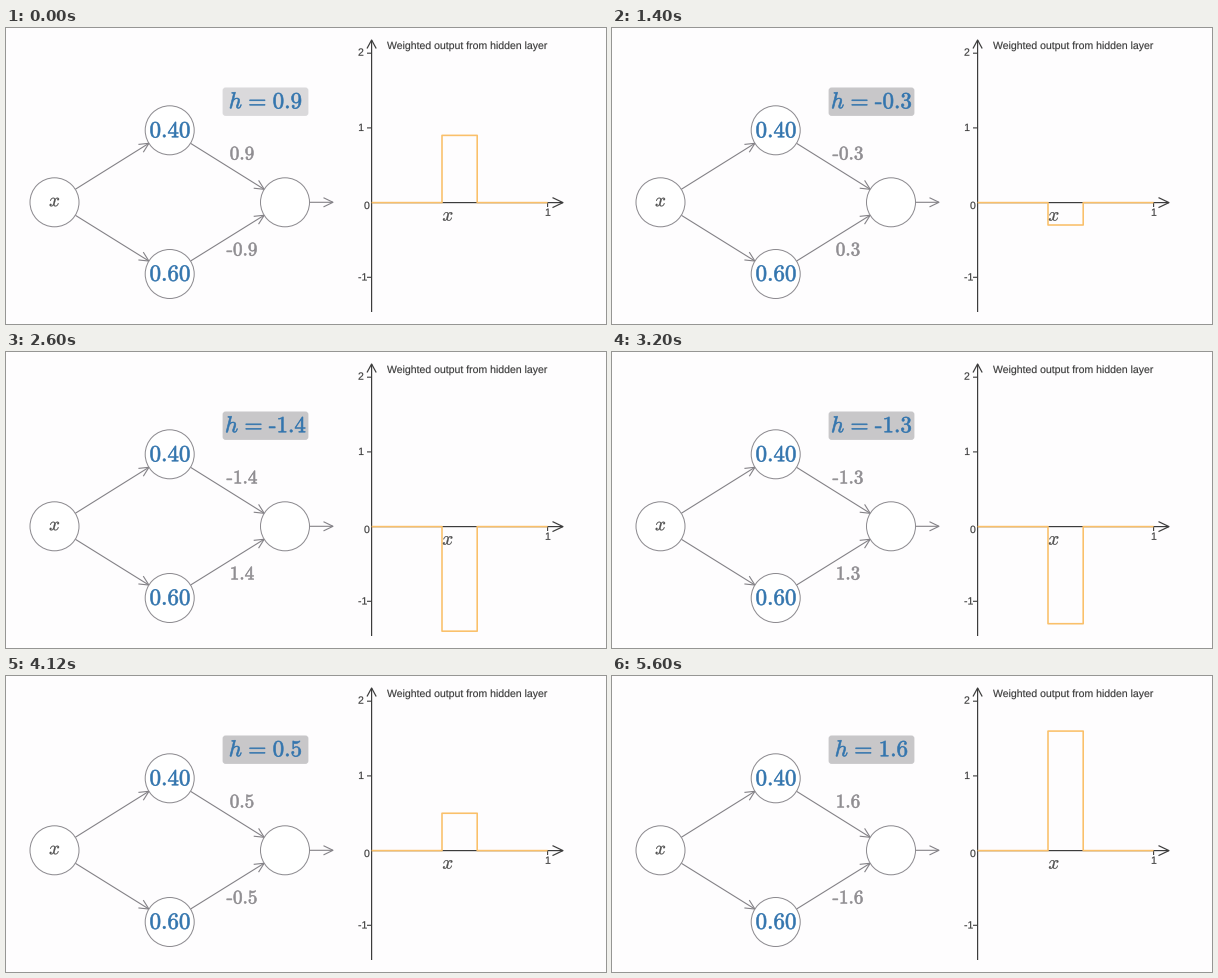
A matplotlib script for the animation above (5.72 s loop, 600 by 296 pixels).

```python
import numpy as np
import matplotlib.pyplot as plt
from matplotlib.animation import FuncAnimation
from matplotlib.patches import Circle, FancyBboxPatch, PathPatch, Rectangle
from matplotlib.path import Path
from matplotlib.textpath import TextPath

W, H, DPI = 600, 296, 100
PX = 72 / DPI  # one pixel in points
INTERVAL, LOOP = 40, 5720

BG, INK, DARK = "#fefdfe", "#3c3c3c", "#505050"
GREY, WIRE, RING = "#8f8d91", "#838186", "#8c8a8f"
BLUE, ORANGE = "#3375ae", "#fac06a"
BOX_IDLE, BOX_HOVER = "#dad9db", "#c8c7c9"

plt.rcParams["mathtext.fontset"] = "cm"
plt.rcParams["path.snap"] = False

fig = plt.figure(figsize=(W / DPI, H / DPI), dpi=DPI, facecolor=BG)
ax = fig.add_axes([0, 0, 1, 1])
ax.set(xlim=(0, W), ylim=(H, 0))
ax.axis("off")


def line(xs, ys, color=WIRE, lw=1.1, z=1):
    return ax.plot(xs, ys, color=color, lw=lw * PX, zorder=z,
                   solid_joinstyle="round", solid_capstyle="butt")[0]


def arrow(start, end, color=WIRE, lw=1.1, size=9.5, spread=4.6):
    start, end = np.array(start, float), np.array(end, float)
    d = (end - start) / np.hypot(*(end - start))
    n = np.array([-d[1], d[0]])
    line(*zip(start, end), color, lw)
    barbs = [end - size * d + spread * n, end, end - size * d - spread * n]
    line(*zip(*barbs), color, lw)


# Glyph outlines in em units, y up
def glyphs(s):
    return TextPath((0, 0), s, size=1)


def bar(x0, x1, y0, y1):
    return Path([(x0, y0), (x1, y0), (x1, y1), (x0, y1), (x0, y0)],
                closed=True)


def shift(path, dx):
    return Path(path.vertices + [dx, 0], path.codes)


def number(s):
    """Outline and advance width of a number with a hyphen as its sign."""
    digits = s.lstrip("-")
    width = sum(0.278 if c == "." else 0.5 for c in digits)
    path = glyphs(f"${digits}$")
    if s == digits:
        return path, width
    hyphen = bar(0.011, 0.276, 0.187, 0.245)
    return Path.make_compound_path(hyphen, shift(path, 0.333)), width + 0.333


def equation(s):
    value, width = number(s)
    path = Path.make_compound_path(
        glyphs("$h$"), bar(0.91, 1.576, 0.327, 0.367),
        bar(0.91, 1.576, 0.133, 0.173), shift(value, 1.909))
    return path, width + 1.909


def place(path, width, cx, base, size):
    return Path((path.vertices - [width / 2, 0]) * [size, -size] + [cx, base],
                path.codes)


def ink(color, weight=0.4, z=4):
    patch = PathPatch(Path([(0, 0)]), facecolor=color, edgecolor=color,
                      lw=weight * PX, zorder=z)
    return ax.add_patch(patch)


def label(s, x, base, size=10.5, color="#3a3a3a"):
    path = TextPath((0, 0), s, size=1, prop={"family": "Liberation Sans"})
    ink(color, 0.15).set_path(place(path, 0, x, base, size))


# Network
R = 24.5
nodes = [(48.5, 174.3), (163.7, 102.3), (163.7, 246), (279, 174.3)]
for c in nodes:
    ax.add_patch(Circle(c, R, facecolor="white", edgecolor=RING, lw=PX,
                        zorder=2))
for i, j in [(0, 1), (0, 2), (1, 3), (2, 3)]:
    a, b = np.array(nodes[i]), np.array(nodes[j])
    d = (b - a) / np.hypot(*(b - a)) * R
    arrow(a + d, b - d)
arrow((303.5, 174.3), (327, 174.3))

ink(DARK, 0.3).set_path(place(glyphs("$x$"), 0.572, 48.5, 178.3, 19))
for s, base in [("0.40", 109.3), ("0.60", 252.8)]:
    ink(BLUE, 0.6).set_path(place(*number(s), 164, base, 23))

# Plot
X0, Y0, SX, SY = 365.6, 174.6, 176, 74.7
arrow((X0, 284), (X0, 12), INK, 1.2, 8.5, 4.6)
arrow((X0, Y0), (557, Y0), INK, 1.2, 10.5, 5)
for v in (2, 1, -1):
    line([361, X0], [Y0 - v * SY] * 2, INK)
line([X0 + SX] * 2, [Y0, 179], INK)
label("2", 352, 27.7)
label("1", 352.2, 103)
label("0", 358, 181)
label("-1", 352, 252.5)
label("1", 539, 187.8)
label("Weighted output from hidden layer", 381, 21)
ink(DARK, 0.3).set_path(place(glyphs("$x$"), 0.572, 441.8, 192.7, 19))

# Moving parts
box = ax.add_patch(FancyBboxPatch((219.6, 62.5), 79.8, 22.4, lw=0, zorder=3,
                                  boxstyle="round,pad=3,rounding_size=3"))
eq_text = ink(BLUE, 0.6)
top_text, low_text = ink(GREY, 0.6), ink(GREY, 0.6)
curve = line([], [], ORANGE, 1.6, 3)
curve.set_clip_path(Rectangle((0, 0), W, 285, transform=ax.transData))

# Drag of the height: tick of 100 ms -> h
KEYS = [(1, .9), (7, .6), (14, -.3), (20, -1.1), (22, -1.2), (23, -1.2),
        (27, -1.5), (30, -1.5), (32, -1.3), (34, -1.0), (37, -.1),
        (45, 1.0), (52, 1.6)]


def draw(n):
    tick = n * INTERVAL // 100
    h = round(float(np.interp(tick, *zip(*KEYS))), 1) + 0.0
    box.set_facecolor(BOX_HOVER if tick else BOX_IDLE)
    eq_text.set_path(place(*equation(f"{h:.1f}"), 259.4, 80.3, 23))
    top_text.set_path(place(*number(f"{h:.1f}"), 236, 131.5, 19.2))
    low_text.set_path(place(*number(f"{0.0 - h:g}"), 236, 227.5, 19.2))
    steps = np.array([0, .4, .4, .6, .6, 1])
    level = np.array([0, 0, h, h, 0, 0])
    curve.set_data(X0 + SX * steps, Y0 - SY * level)
    return box, eq_text, top_text, low_text, curve


anim = FuncAnimation(fig, draw, frames=LOOP // INTERVAL, interval=INTERVAL,
                     init_func=lambda: draw(0), repeat=True, repeat_delay=0)
plt.show()
```
